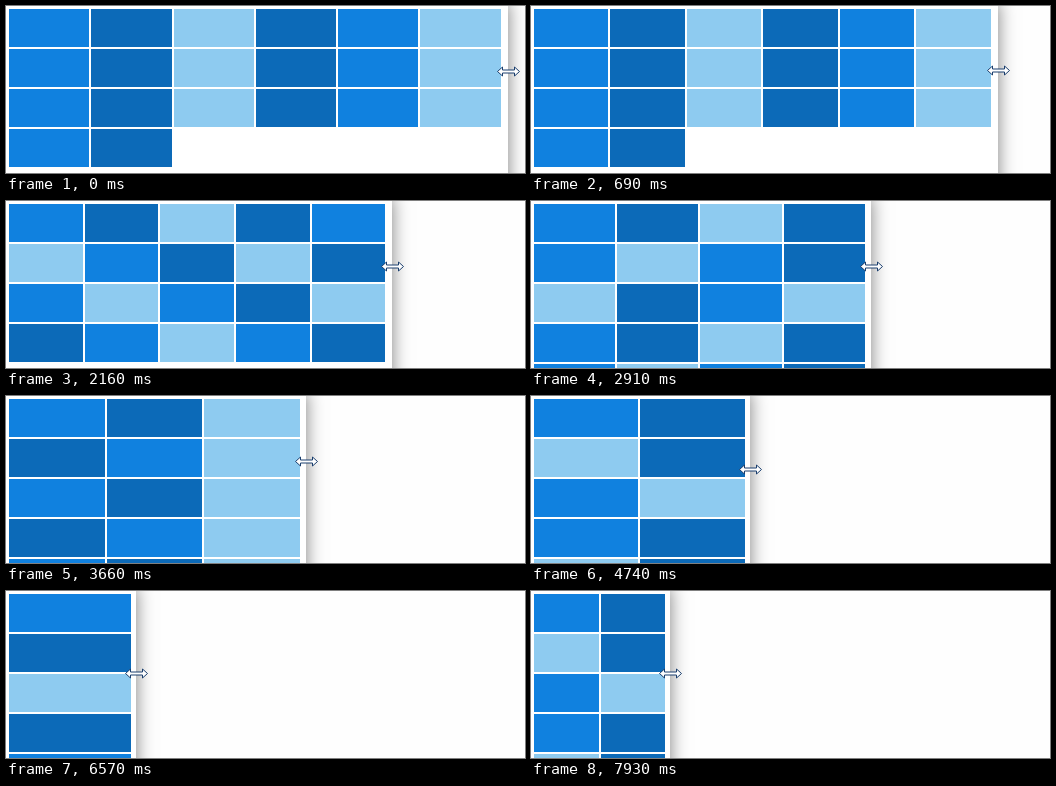
An HTML page with a canvas for the animation above (7.99 s loop, 519 by 167 pixels).

```html
<!DOCTYPE html>
<html lang="en">
<head>
<meta charset="utf-8">
<title>Resizing a tile grid</title>
<style>
  html, body { margin: 0; width: 100%; height: 100%; overflow: hidden; background: #fefefe; }
  canvas { display: block; }
</style>
</head>
<body>
<canvas id="stage" width="519" height="167"></canvas>
<script>
const ctx = document.getElementById('stage').getContext('2d');
const LOOP = 7990;
const MID = '#1081df', DARK = '#0c6ab8', LIGHT = '#8ecbf0';
const COLORS = [MID, DARK, LIGHT, DARK, MID, LIGHT];
const TILES = 20, MARGIN = 3, GAP = 2, ROW = 40;

// Panel edges at which one more column fits
const BREAKPOINTS = [137, 232, 310, 385, 462];

// [time, value] pairs
const EDGE = [
  [0, 502], [820, 461], [1470, 418.5], [1620, 410], [2160, 386.5], [2430, 371],
  [3240, 319], [3660, 300], [4050, 262], [4740, 219.5], [4890, 198],
  [5670, 167], [5700, 165], [6510, 133], [6600, 129], [7700, 129], [7930, 139]
];
const POINTER_Y = [
  [0, 65.5], [1470, 63.5], [2160, 65.5], [3660, 65.5], [4740, 73.5],
  [5670, 79.5], [6510, 82.5]
];

function valueAt(keys, t) {
  const next = keys.findIndex(key => key[0] > t);
  if (next < 0) return keys[keys.length - 1][1];
  const [t0, v0] = keys[next - 1], [t1, v1] = keys[next];
  return v0 + (v1 - v0) * (t - t0) / (t1 - t0);
}

function drawPanel(edge) {
  ctx.save();
  ctx.shadowColor = 'rgba(0, 0, 0, 0.5)';
  ctx.shadowBlur = 17;
  ctx.fillStyle = '#fff';
  ctx.fillRect(-40, -4, edge + 40, 240);
  ctx.restore();
}

function drawTiles(edge) {
  const columns = 1 + BREAKPOINTS.filter(limit => edge >= limit).length;
  const right = edge * 0.993 - 3.8;
  const pitch = (right - MARGIN + GAP) / columns;
  for (let i = 0; i < TILES; i++) {
    const column = i % columns, row = Math.floor(i / columns);
    const x0 = Math.round(MARGIN + column * pitch);
    const x1 = Math.round(MARGIN + (column + 1) * pitch - GAP);
    ctx.fillStyle = COLORS[i % COLORS.length];
    ctx.fillRect(x0, MARGIN + row * ROW, x1 - x0, ROW - GAP);
  }
}

function drawPointer(x, y) {
  ctx.save();
  ctx.translate(x, y);
  ctx.beginPath();
  for (const s of [1, -1]) {
    ctx.lineTo(-6 * s, -1.5 * s);
    ctx.lineTo(6 * s, -1.5 * s);
    ctx.lineTo(6 * s, -4.5 * s);
    ctx.lineTo(11 * s, 0);
    ctx.lineTo(6 * s, 4.5 * s);
    ctx.lineTo(6 * s, 1.5 * s);
  }
  ctx.closePath();
  ctx.fillStyle = '#fff';
  ctx.strokeStyle = '#1b3f6e';
  ctx.lineWidth = 1;
  ctx.fill();
  ctx.stroke();
  ctx.restore();
}

function draw(t) {
  const edge = Math.round(valueAt(EDGE, t));
  ctx.fillStyle = '#fefefe';
  ctx.fillRect(0, 0, 519, 167);
  drawPanel(edge);
  drawTiles(edge);
  drawPointer(edge + 0.5, Math.floor(valueAt(POINTER_Y, t)) + 0.5);
}

const start = performance.now();
function tick() {
  draw((performance.now() - start) % LOOP);
  requestAnimationFrame(tick);
}
tick();
</script>
</body>
</html>
```
